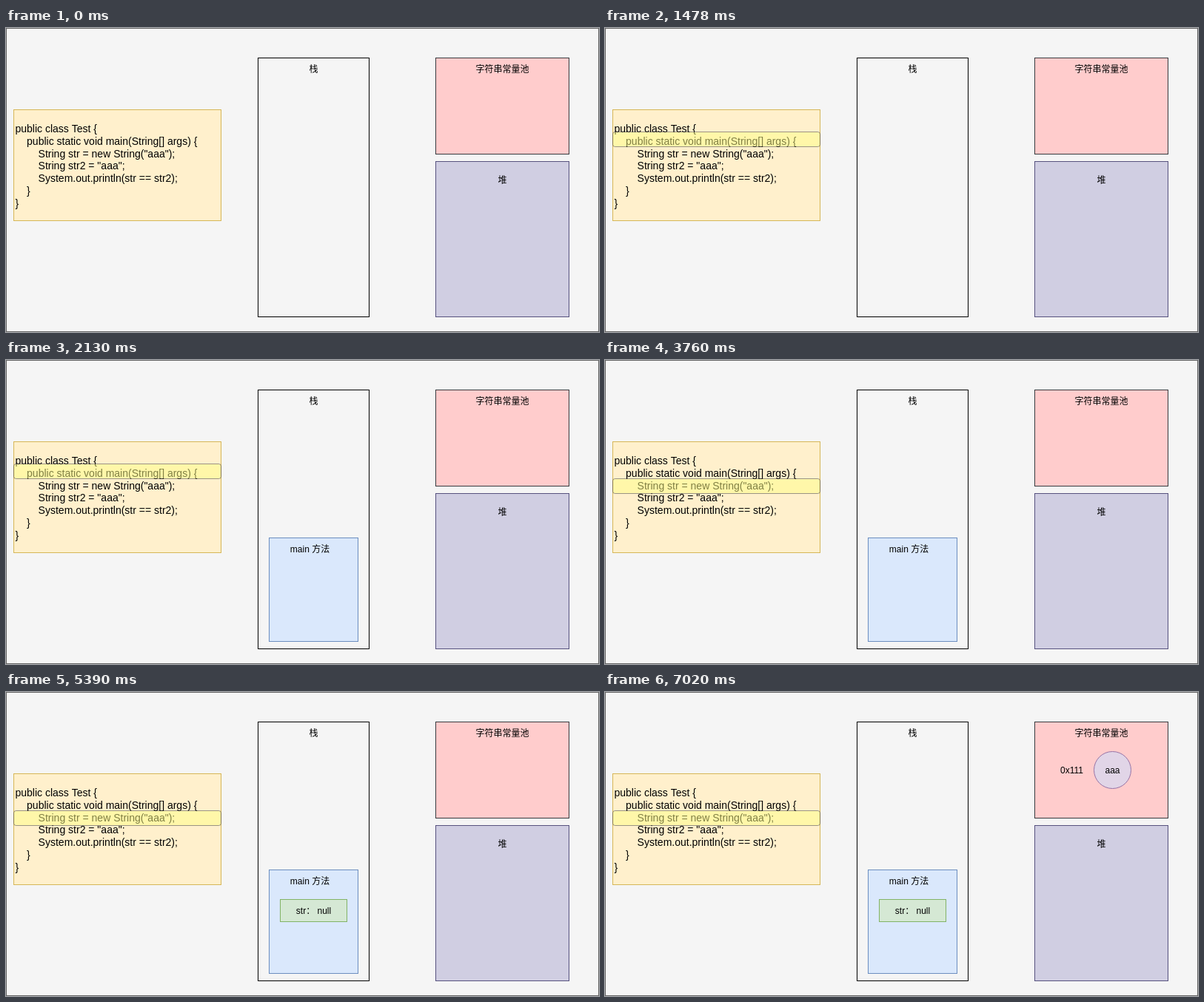
These frames come from a looping animation (801 by 411 pixels, 8 s). An HTML page with a canvas:

```html
<!DOCTYPE html>
<html lang="zh-CN">
<head>
<meta charset="utf-8">
<title>String memory</title>
<style>
html, body { margin: 0; width: 100%; height: 100%; overflow: hidden; background: #f5f5f5; }
canvas { display: block; width: 801px; height: 411px; }
</style>
</head>
<body>
<canvas id="stage" lang="zh-CN"></canvas>
<script>
const W = 801, H = 411, LOOP = 8000;
const FONT = '"Liberation Sans", "Noto Sans CJK SC", "Noto Sans CJK", sans-serif';
const CODE = [
  'public class Test {',
  '    public static void main(String[] args) {',
  '        String str = new String("aaa");',
  '        String str2 = "aaa";',
  '        System.out.println(str == str2);',
  '    }',
  '}'
];
const canvas = document.getElementById('stage');
const ctx = canvas.getContext('2d');
const dpr = window.devicePixelRatio || 1;
canvas.width = Math.round(W * dpr);
canvas.height = Math.round(H * dpr);
ctx.scale(dpr, dpr);

// Integer positions, shifted half a pixel for crisp one-pixel borders.
function box(x, y, w, h, fill, stroke) {
  ctx.fillStyle = fill;
  ctx.strokeStyle = stroke;
  ctx.fillRect(x, y, w + 1, h + 1);
  ctx.strokeRect(x + 0.5, y + 0.5, w, h);
}

function label(text, x, y) {
  ctx.font = '12px ' + FONT;
  ctx.textAlign = 'center';
  ctx.fillStyle = '#000';
  ctx.fillText(text, x, y);
}

function code() {
  box(10, 110, 280, 150, '#fff0cc', '#d6b656');
  ctx.font = '14px ' + FONT;
  ctx.textAlign = 'left';
  ctx.fillStyle = '#000';
  CODE.forEach((line, i) => ctx.fillText(line, 12.5, Math.round(141 + i * 16.8)));
}

function highlight(y) {
  ctx.save();
  ctx.globalAlpha = 0.5;
  ctx.fillStyle = '#ffff88';
  ctx.strokeStyle = '#36393d';
  ctx.beginPath();
  ctx.roundRect(11, y + 1, 279, 19, 2.5);
  ctx.fill();
  ctx.beginPath();
  ctx.roundRect(10.5, y + 0.5, 280, 20, 3);
  ctx.stroke();
  ctx.restore();
}

function pooledString() {
  ctx.beginPath();
  ctx.arc(685.5, 105.5, 25, 0, Math.PI * 2);
  ctx.fillStyle = '#e1d5e7';
  ctx.strokeStyle = '#9673a6';
  ctx.fill();
  ctx.stroke();
  label('aaa', 685.5, 110);
  label('0x111', 630.5, 110);
}

function draw(t) {
  ctx.lineWidth = 1;
  box(0, 0, 800, 410, '#f5f5f5', '#666');
  code();
  box(340, 40, 150, 350, '#f5f5f5', '#000');
  label('栈', 415.5, 60);
  box(580, 40, 180, 130, '#ffcccc', '#36393d');
  label('字符串常量池', 670.5, 60);
  box(580, 180, 180, 210, '#d0cee2', '#56517e');
  label('堆', 670.5, 210);

  if (t >= 500) highlight(t < 3760 ? 140 : 160);
  if (t >= 2130) {
    box(355, 240, 120, 140, '#dae8fc', '#6c8ebf');
    label('main 方法', 410.5, 260);
  }
  if (t >= 5390) {
    box(370, 280, 90, 30, '#d5e8d4', '#82b366');
    label('str： null', 415.5, 300);
  }
  if (t >= 7020) pooledString();
}

const start = performance.now();
function tick() {
  draw((performance.now() - start) % LOOP);
  requestAnimationFrame(tick);
}
tick();
</script>
</body>
</html>
```
